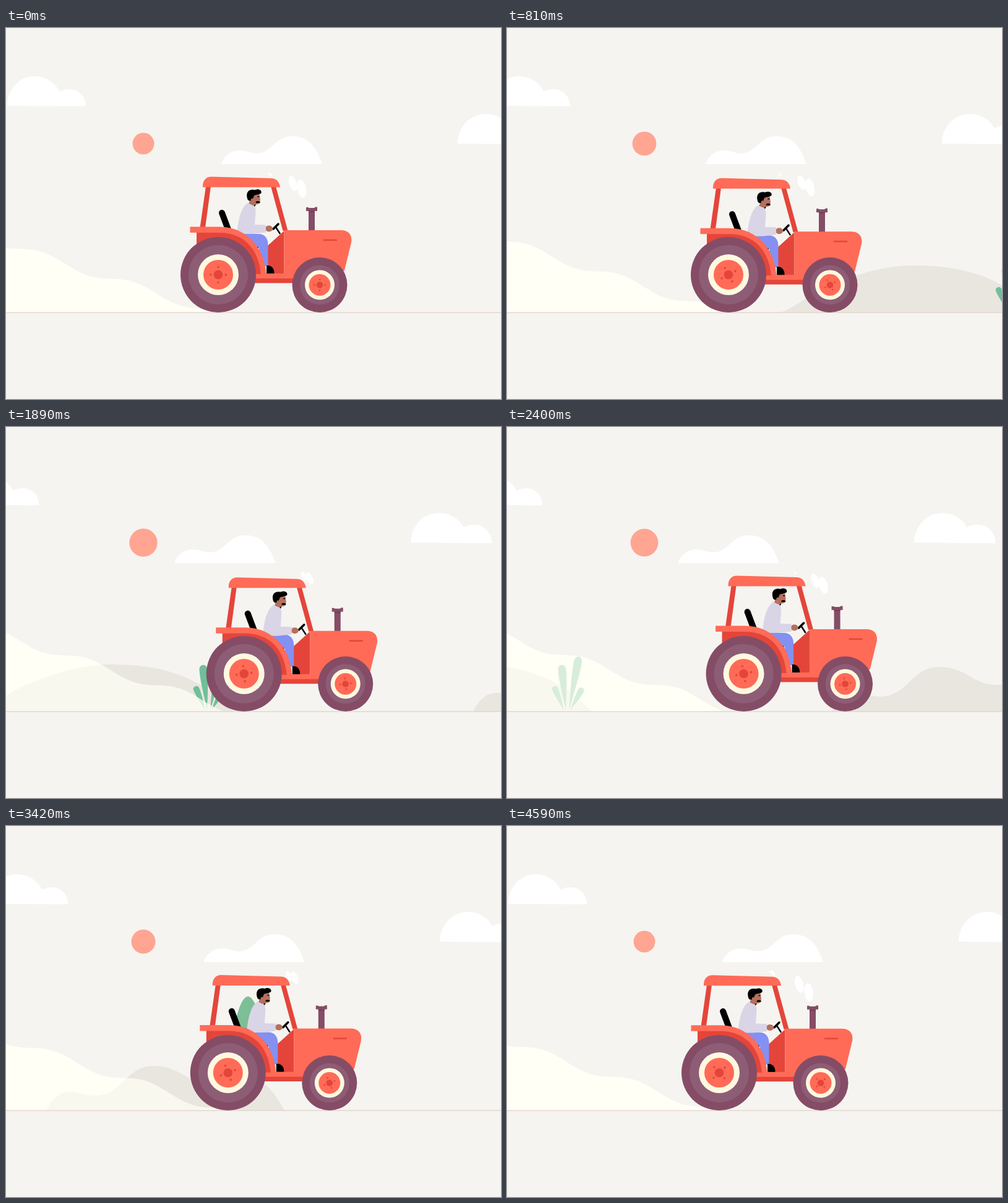
An HTML page for the animation above (4.62 s loop, 800 by 600 pixels).

```html
<!DOCTYPE html>
<html lang="en">
<head>
<meta charset="utf-8">
<title>Tractor ride</title>
<style>
  html, body { margin: 0; width: 100%; height: 100%; overflow: hidden; background: #f5f4f0; }
  svg { display: block; width: 100%; height: 100%; }
  .red { fill: #ff6b57; }
  .dark { fill: #e4453a; }
  .plum { fill: #854c66; }
  .skin { fill: #b5705d; }
  .hill { fill: #e9e6df; }
  .leaf { fill: #70bf9a; }
  .line { fill: none; stroke: #000; stroke-linecap: round; }
</style>
</head>
<body>
<svg viewBox="0 0 800 600">
  <defs>
    <path id="leaf" d="M0 0C-3 -25 -7 -50 -6.5 -66C-6 -76 6 -76 6.5 -66C7 -50 3 -25 0 0Z"/>
    <clipPath id="frontClip"><path id="clipPath"/></clipPath>
  </defs>
  <rect width="800" height="600" fill="#f5f4f0"/>

  <g id="clouds" fill="#fff">
    <path d="M2 126C2 99 22 78 46 78C64 78 79 88 87 103C108 92 129 105 129 126.5Z"/>
    <path d="M348 220C352 207 364 198 378 198C393 198 398 206 415 201C432 195 438 175 462 175C488 175 502 192 511 220Z"/>
    <path d="M730 187C730 160 750 139 775 139C793 139 807 148 815 162C838 150 861 164 861 188Z"/>
  </g>
  <circle id="sun" cx="222" cy="187" r="17.5" fill="#ffa592"/>

  <g id="scene">
    <path class="hill" d="M808 460C835 450 850 434 871 424C910 406 965 384 1023 384C1080 384 1125 393 1168 417C1190 430 1204 447 1221 460Z"/>
    <g class="leaf">
      <use href="#leaf" transform="translate(1183 458) rotate(10.4) scale(1 1.2)"/>
      <use href="#leaf" transform="translate(1178 458) rotate(-5.4)"/>
      <use href="#leaf" transform="translate(1175 458) rotate(-23) scale(.75 .57)"/>
      <use href="#leaf" transform="translate(1185 458) rotate(29) scale(.75 .56)"/>
    </g>
    <path class="hill" d="M1608 460C1618 440 1630 430 1646 430C1662 430 1668 436 1686 436C1732 436 1735 388 1782 388C1826 388 1836 418 1876 417C1896 416 1912 408 1934 408C1962 408 1978 434 1993 460Z"/>
    <rect x="1931" y="380" width="6" height="28" fill="#d6cfc9"/>
    <path fill="#7cbf96" d="M1934 275.500C1921 277 1911 318 1911 348C1911 370 1919 385.500 1934 385.500C1949 385.500 1957 370 1957 348C1957 318 1947 277 1934 275.500Z"/>
    <path fill="#69b087" d="M1943 286C1952 303 1957 328 1957 348C1957 370 1949 385.500 1935 385.500C1948 374 1953 355 1952 336C1951 315 1947 300 1943 286Z"/>
  </g>

  <path id="front" fill="#fffff6"/>
  <g clip-path="url(#frontClip)"><use href="#scene" opacity=".28"/></g>
  <rect y="459.600" width="800" height="1.200" fill="#e2d0c8"/>

  <g id="tractor">
    <g id="smoke" fill="#fff"></g>
    <g id="body">
      <path class="dark" d="M323 256H331L322 323H313.500ZM428 256H436L455.500 328H447.500Z"/>
      <path class="red" d="M318 257.500C317.500 247 323 240.500 332 240.500L428 243C437 243 442 249 443 257.500Z"/>
      <path class="dark" d="M423 352L449.500 328V398H423ZM400 403H500V412.500H400Z"/>
      <path class="red" d="M400 397H500V405H400Z"/>
      <path class="plum" d="M489 294H499V329H489ZM485 290H488L490 291H498L500 289.500H503V296H485Z"/>
      <path fill="#743f59" d="M489 296H499V298H489Z"/>
      <path class="red" d="M449.500 327H541C554 327 560 335 558 347L547 392L520 404H449.500Z"/>
      <path d="M513 343H535" stroke="#e4453a" stroke-width="2.500"/>

      <path class="line" d="M349 299L361 331" stroke-width="10"/>
      <path d="M385 345H408V356H385Z"/>
      <path fill="#8490f2" d="M380 333H408C418 333 423.500 340 423.500 350V385H409V355L385 345Z"/>
      <path d="M421 384C429 383 434 389 433.500 397H421Z"/>
      <path class="line" d="M432 325L440 317" stroke-width="3.500"/>
      <path class="line" d="M436 322L443 333" stroke-width="2.500" style="stroke-linecap:butt"/>
      <g id="man">
        <path class="skin" d="M395 268H409.500L411 278L409.500 284C406 286 403 285 402 285L400.500 291L391 288L394 279Z"/>
        <path d="M390 276C387 265 393 260 402 262C408 259.500 414 262 412.500 267C409 270 404 269 401 271L399 276C397 275 395 276 396 279C393 280 391 279 390 276ZM403.500 281.500C405 279.500 409 279.500 411 281.500L410 283H404ZM406.500 272H409.500V273.500H406.500ZM401 286L404 285L401.500 290Z"/>
        <ellipse class="skin" cx="425" cy="324.500" rx="6" ry="5"/>
        <path fill="#d9d5e6" d="M391 283C382 288 376 303 373 333H398L420 330.500V318.500L402 318L403.500 298C404 289 401 287 397 286Z"/>
      </g>
      <path class="dark" d="M308 328H345C390 331 411 362 414 398H308Z"/>
      <path class="red" d="M297.500 321.500H345C392 322 418 358 420.500 398H412C409 362 388 331 345 331H297.500Z"/>
    </g>
    <g id="wheels"></g>
  </g>
</svg>
<script>
const LOOP = 4620, SCROLL = 0.451;
const $ = id => document.getElementById(id);

function add(parent, tag, attrs) {
  const el = document.createElementNS('http://www.w3.org/2000/svg', tag);
  for (const k in attrs) el.setAttribute(k, attrs[k]);
  return parent.appendChild(el);
}
const move = (el, x, y) => el.setAttribute('transform', `translate(${x} ${y})`);

// Rings from outside in, then bolts on a circle of radius b
function wheel(cx, cy, radii, b, boltR) {
  const g = add($('wheels'), 'g', { transform: `translate(${cx} ${cy})` });
  const colors = ['#854c66', '#8d5d75', '#fff8e1', '#ff6b57', '#e4453a'];
  radii.forEach((r, i) => add(g, 'circle', { r, fill: colors[i] }));
  const bolts = add(g, 'g', { fill: '#e4453a' });
  for (const [x, y] of [[0, -b], [b, 0], [0, b], [-b, 0]])
    add(bolts, 'circle', { cx: x, cy: y, r: boltR });
  return bolts;
}
const bolts = [
  wheel(343, 399, [61, 48, 33, 24, 7.3], 12.2, 1.8),
  wheel(507, 415.5, [44.5, 32, 24, 17.5, 5.3], 8.7, 1.4)
];

// Two alternating streams, each with two puffs alive at once
const CYCLE = 780, LIFE = 1180;
const puffs = [490, 490, 636, 636].map((birth, i) => ({
  birth, older: i % 2 * CYCLE, el: add($('smoke'), 'ellipse', {})
}));

const wave = u => (1 - Math.cos(Math.PI * Math.min(1, Math.max(0, u)))) / 2;
const travel = t => t < 2010 ? wave(t / 1990) : 1 - wave((t - 2030) / 2400);

// Smooth curve through [time, value] points
function curve(pts, t) {
  const at = i => pts[Math.min(pts.length - 1, Math.max(0, i))];
  let i = 0;
  while (i < pts.length - 2 && t >= pts[i + 1][0]) i++;
  const slope = k => (at(k + 1)[1] - at(k - 1)[1]) / (at(k + 1)[0] - at(k - 1)[0]);
  const [t0, v0] = at(i), [t1, v1] = at(i + 1), d = t1 - t0, u = (t - t0) / d;
  const s = u * u * (3 - 2 * u);
  return v0 + (v1 - v0) * s + d * u * (1 - u) * (slope(i) * (1 - u) - slope(i + 1) * u);
}
const drift = [[0, 0], [810, 24], [1380, 69], [2400, 78], [3000, 113], [3810, 139], [LOOP, 148]];

function frontHill(t, e) {
  const shoulder = 170 - curve(drift, t), base = 350 - 12 * e;
  let d = 'M-6 460';
  for (let x = -6; x <= 420; x += 6) {
    const y = base + 0.327 * x - 7 * Math.sin(2 * Math.PI * (x - shoulder) / 148);
    d += `L${x} ${Math.min(460, y).toFixed(2)}`;
  }
  return d + 'V460Z';
}

function drawSmoke(t) {
  for (const { birth, older, el } of puffs) {
    const age = (t - birth + 2 * CYCLE) % CYCLE + older;
    const u = age / LIFE;
    if (u >= 1) { el.setAttribute('ry', 0); continue; }
    const p = 1 - (1 - u) ** 2;
    const r = 17 * Math.min(1, u / 0.05) * Math.sqrt(1 - p);
    el.setAttribute('rx', r * 0.48);
    el.setAttribute('ry', r);
    el.setAttribute('transform',
      `translate(${494 - 70 * p} ${290 - 54 * p ** 0.4}) rotate(${-5 - 30 * p})`);
  }
}

function draw() {
  const t = performance.now() % LOOP;
  const e = travel(t);
  const bob = 1.5 * (1 - Math.cos(2 * Math.PI * t / 1200));

  move($('clouds'), -76 * e, 0);
  $('sun').setAttribute('r', 17.5 + 5.2 * e);
  move($('scene'), -SCROLL * t, 0);
  const hill = frontHill(t, e);
  $('front').setAttribute('d', hill);
  $('clipPath').setAttribute('d', hill);

  move($('tractor'), 42 * e, 0);
  move($('body'), 0, bob);
  move($('man'), 0, bob * 0.7);
  for (const b of bolts) b.setAttribute('transform', `rotate(${0.52 * t})`);
  drawSmoke(t);
  requestAnimationFrame(draw);
}
draw();
</script>
</body>
</html>
```
